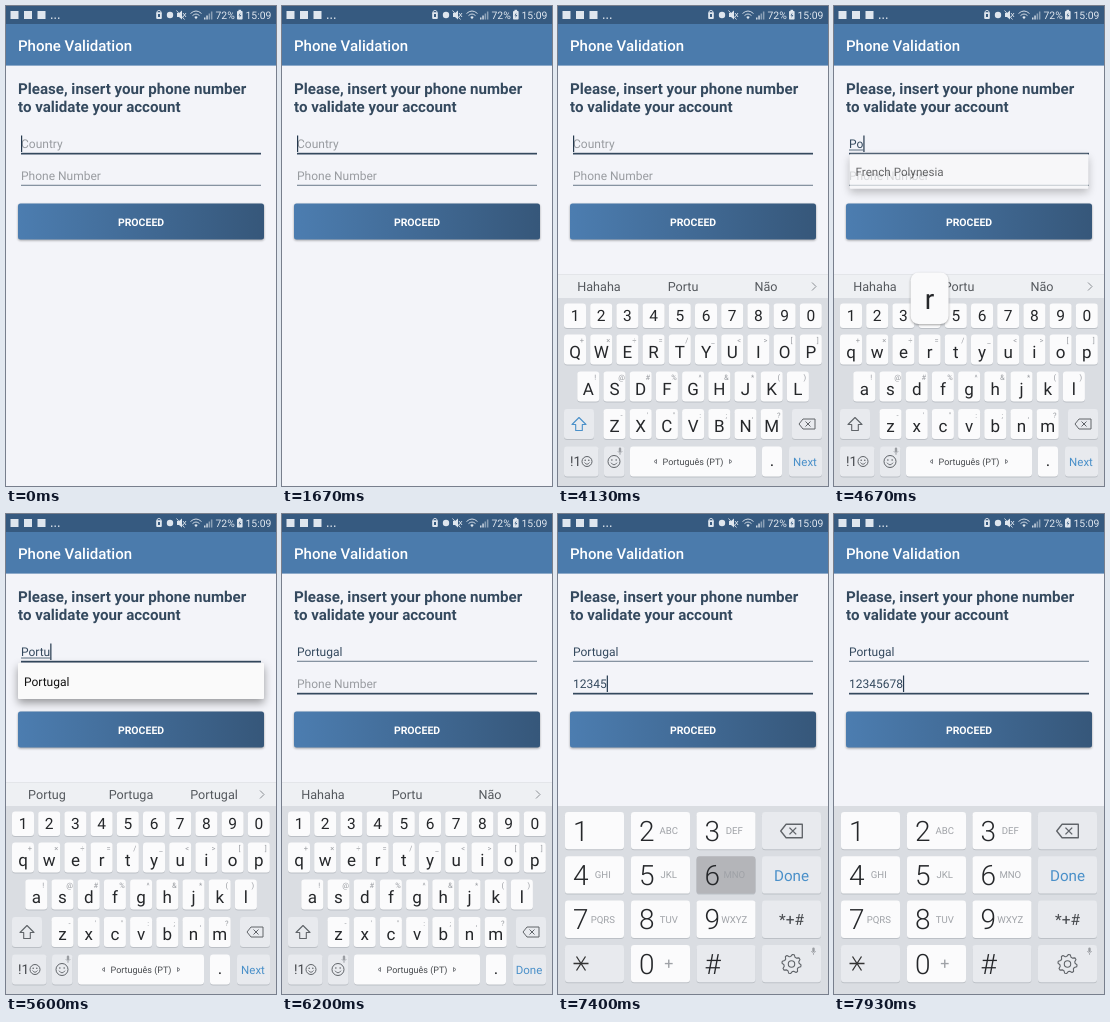
An HTML page that plays this animation: 270 by 480 pixels, repeating every 8 s.

```html
<!DOCTYPE html>
<html lang="en">
<head>
<meta charset="utf-8">
<title>Phone validation</title>
<style>
html, body { margin: 0; width: 100%; height: 100%; overflow: hidden; background: #f3f4f9; }
svg { display: block; width: 270px; height: 480px; }
text { font-family: Roboto, "Noto Sans", sans-serif; white-space: pre; text-rendering: geometricPrecision; }
.raised { filter: drop-shadow(0 1px 1.2px rgba(0, 0, 0, .35)); }
.menu { filter: drop-shadow(0 4px 4.5px rgba(0, 0, 0, .38)); }
</style>
</head>
<body>
<svg id="stage" viewBox="0 0 270 480">
  <defs>
    <linearGradient id="blue"><stop stop-color="#4c7db0"/><stop offset="1" stop-color="#36577a"/></linearGradient>
  </defs>
</svg>
<script>
const LOOP = 8000;
const INK = '#34495e', KEY = '#fbfbfc', SOFT = '#e8eaee', DOWN = '#b4b5b9', LINK = '#4a90c9', ICON = '#606469';
const stage = document.getElementById('stage');

function add(parent, tag, attrs, content) {
  const node = document.createElementNS('http://www.w3.org/2000/svg', tag);
  for (const name in attrs) node.setAttribute(name, attrs[name]);
  if (content !== undefined) node.textContent = content;
  return parent.appendChild(node);
}
const group = (parent, attrs = {}) => add(parent, 'g', attrs);
const rect = (parent, x, y, width, height, fill, rx = 0, more = {}) =>
  add(parent, 'rect', { x, y, width, height, fill, rx, ...more });
const label = (parent, str, x, y, size, fill, more = {}) =>
  add(parent, 'text', { x, y, 'font-size': size, fill, ...more }, str);
const mid = (parent, str, x, y, size, fill, more = {}) =>
  label(parent, str, x, y, size, fill, { 'text-anchor': 'middle', ...more });
const line = (parent, d, stroke, width = 1) =>
  add(parent, 'path', { d, stroke, fill: 'none', 'stroke-width': width, 'stroke-linejoin': 'round' });
const shape = (parent, d, fill) => add(parent, 'path', { d, fill });
const show = (node, on) => node.setAttribute('visibility', on ? 'inherit' : 'hidden');
const clamp = v => Math.max(0, Math.min(1, v));
const ramp = (t, from, to) => clamp((t - from) / (to - from));
const latest = (steps, t) => steps.reduce((found, step) => t >= step[0] ? step[1] : found, steps[0][1]);
const within = (spans, t) => spans.some(([from, to]) => t >= from && t < to);

// ---- page ----
rect(stage, 0, 0, 270, 480, '#f3f4f9');
rect(stage, 0, 18, 270, 41.6, '#4b7bac');
rect(stage, 0, 0, 270, 18, '#365a80');
drawStatus();
label(stage, 'Phone Validation', 12, 45, 15, '#fff', { 'font-weight': 500 });
label(stage, 'Please, insert your phone number', 12, 88, 15.1, INK, { 'font-weight': 700 });
label(stage, 'to validate your account', 12, 105.6, 15.1, INK, { 'font-weight': 700 });
const country = makeField('Country', 142);
const phone = makeField('Phone Number', 174);
rect(stage, 12, 197.5, 246, 36, 'url(#blue)', 2.5, { class: 'raised' });
mid(stage, 'PROCEED', 135, 219.6, 10.5, '#fff', { 'font-weight': 700 });

const menu = group(stage);
const menuRow = rect(menu, 12, 149, 246, 36, '#fafafa', 1, { class: 'menu' });
const menuText = label(menu, '', 18, 171.7, 12, '#111');

function drawStatus() {
  const s = group(stage), c = '#dfe6ee';
  for (const x of [4.5, 18, 31.5]) rect(s, x, 5, 8, 8, c);
  for (const x of [45, 48.5, 52]) rect(s, x, 11.5, 1.4, 1.4, c);
  line(s, 'M151 7V5.500Q153 3 155 5.500V7', c, .9);
  rect(s, 150.2, 6.2, 5.6, 6.8, c, 1);
  rect(s, 152, 8, 2, 3, '#365a80');
  add(s, 'circle', { cx: 164, cy: 9, r: 3.2, fill: c });
  shape(s, 'M171 7h2l3-2.5v9L173 11h-2z', c);
  line(s, 'M170.5 4.5l8 9M177 7l3 4M180 7l-3 4', c, .9);
  line(s, 'M184.5 7.5Q190 2.5 195.5 7.5M186.5 9.6Q190 6.4 193.5 9.6', c, .9);
  shape(s, 'M188.3 11Q190 9.6 191.7 11L190 13.2z', c);
  for (let i = 0; i < 4; i++)
    rect(s, 198 + i * 2.3, 11.5 - i * 2, 1.5, 2 + i * 2, c, 0, { opacity: i < 2 ? .9 : .5 });
  label(s, '72%', 209.5, 13, 10.4, c);
  rect(s, 231, 5, 5.6, 8.6, c, .8);
  rect(s, 232.5, 3.8, 2.6, 1.4, c);
  shape(s, 'M234.5 6.5l-2 3h1.4l-.6 2.6 2-3.2h-1.4z', '#365a80');
  label(s, '15:09', 239.5, 13, 10.4, c);
}

function makeField(hint, y) {
  const holder = label(stage, hint, 15, y, 12, '#999ca1');
  const value = label(stage, '', 15, y, 12, INK);
  const compose = rect(stage, 15, y + 1.6, 0, .8, INK);
  const rule = rect(stage, 15, y + 4.8, 240, 1, INK);
  const caret = rect(stage, 15, y - 12.5, 1.2, 16.5, '#25394e');
  return (str, focused, blink, composing) => {
    if (value.textContent !== str) value.textContent = str;
    const width = str ? value.getComputedTextLength() : 0;
    show(holder, !str);
    compose.setAttribute('width', composing ? width : 0);
    rule.setAttribute('height', focused ? 1.7 : .9);
    rule.setAttribute('opacity', focused ? 1 : .8);
    caret.setAttribute('x', 15 + width);
    show(caret, blink);
  };
}

// ---- keyboards ----
function key(parent, x, y, w, h, fill = KEY) {
  rect(parent, x, y + 1, w, h, '#a9adb4', 3.2, { opacity: .6 });
  return rect(parent, x, y, w, h, fill, 3.2);
}
function backspace(parent, x, y, s) {
  const g = group(parent, { transform: `translate(${x} ${y}) scale(${s})` });
  line(g, 'M-8 0L-4-5H8V5H-4zM-1.5-2.5l5 5M3.5-2.5l-5 5', ICON, 1);
}
function smile(parent, x, y, r) {
  add(parent, 'circle', { cx: x, cy: y, r, fill: 'none', stroke: ICON });
  for (const d of [-.36, .36]) add(parent, 'circle', { cx: x + d * r, cy: y - .25 * r, r: .8, fill: ICON });
  line(parent, `M${x - .5 * r} ${y + .2 * r}Q${x} ${y + .9 * r} ${x + .5 * r} ${y + .2 * r}`, ICON, .9);
}
function mic(parent, x, y) {
  rect(parent, x - 1.2, y - 3.5, 2.4, 4.6, '#9a9da2', 1.2);
  line(parent, `M${x - 2.3} ${y}q2.3 4 4.6 0M${x} ${y + 2}v2`, '#9a9da2', .7);
}

const board = group(stage);
const qwerty = group(board);
rect(qwerty, 0, 268, 270, 212, '#dadde2');
rect(qwerty, 0, 268, 270, 24, '#eef0f3');
rect(qwerty, 0, 268, 270, .7, '#dfe1e5');
const hints = [41, 125, 208].map(x => mid(qwerty, '', x, 285, 12.6, '#54585d'));
line(qwerty, 'M254 276.5l4 4-4 4', '#8b8f94');

const STEP = 26.2, letters = [], spots = {};
[...'1234567890'].forEach((n, i) => {
  const x = 17 + i * STEP;
  key(qwerty, x - 11, 297.5, 22, 24.5);
  mid(qwerty, n, x, 315, 15.5, '#25272a');
});
[
  ['qwertyuiop', '+×÷=/_<>[]', 17, 328.5],
  ['asdfghjkl', '!@#%^&*()', 30.3, 365.5],
  ['zxcvbnm', '-\'":;,?', 56.5, 403]
].forEach(([row, alts, x0, y]) => [...row].forEach((ch, i) => {
  const x = x0 + i * STEP;
  key(qwerty, x - 11, y, 22, 30);
  mid(qwerty, alts[i], x + 7, y + 8.5, 7.5, '#999ca1');
  letters.push([mid(qwerty, ch, x, y + 23.2, 17, '#25272a'), ch]);
  spots[ch] = [x, y];
}));
key(qwerty, 6, 403, 30, 30, SOFT);
const shift = line(qwerty, 'M21 411.5l7 7h-3.7v6h-6.6v-6h-3.7z', ICON, 1.1);
key(qwerty, 234, 403, 30, 30, SOFT);
backspace(qwerty, 249, 418, 1);
key(qwerty, 6, 440.5, 34.5, 30, SOFT);
label(qwerty, '!1', 12, 460, 13.5, '#45484c');
smile(qwerty, 29, 455.5, 5);
key(qwerty, 46, 440.5, 20.5, 30, SOFT);
smile(qwerty, 56, 455.5, 6);
mic(qwerty, 62, 445);
key(qwerty, 72, 440.5, 126, 30);
mid(qwerty, 'Português (PT)', 135, 458.5, 9, '#45484c');
line(qwerty, 'M98.5 453.5v4l-2.500-2zM171.500 453.500v4l2.500-2z', ICON, .8);
key(qwerty, 204, 440.5, 20, 30);
mid(qwerty, '.', 214, 460, 17, '#25272a');
key(qwerty, 231, 440.5, 33, 30, SOFT);
const action = mid(qwerty, 'Next', 247, 459.5, 11.5, LINK);

const pad = group(board);
rect(pad, 0, 268, 270, 24, '#f3f4f9');
rect(pad, 0, 292, 270, 188, '#dadde2');
const COLS = [7, 73, 138.5, 204], ROWS = [298, 342.3, 386.6, 431];
const padKeys = {};
['1', '2ABC', '3DEF', '4GHI', '5JKL', '6MNO', '7PQRS', '8TUV', '9WXYZ', '*', '0+', '#'].forEach((s, i) => {
  const x = COLS[i % 3], y = ROWS[Math.floor(i / 3)], symbol = '*#'.includes(s);
  padKeys[s[0]] = key(pad, x, y, 59, 37.3, symbol ? SOFT : KEY);
  if (s === '*') line(pad, 'M15.500 449.500h15M18.500 442.500l9 14M27.500 442.500l-9 14', '#333', 1.3);
  else label(pad, s[0], x + 8, y + 28.5, 28, '#25272a', { 'font-weight': 300 });
  mid(pad, s.slice(1), x + 37.8, y + (s === '0+' ? 24 : 22), s === '0+' ? 16 : 9.6, '#9fa2a7');
});
ROWS.forEach(y => key(pad, COLS[3], y, 59, 37.3, SOFT));
backspace(pad, 233.5, 317, 1.35);
mid(pad, 'Done', 233.5, 366.5, 15.2, LINK);
mid(pad, '*+#', 233.5, 411, 15.5, '#45484c');
drawGear(233.5, 450);
mic(pad, 255.5, 437);

function drawGear(cx, cy) {
  let d = '';
  for (let i = 0; i < 32; i++) {
    const a = (i + .5) / 32 * Math.PI * 2, r = i % 4 < 2 ? 9.6 : 7.6;
    d += (i ? 'L' : 'M') + (cx + r * Math.cos(a)).toFixed(2) + ' ' + (cy + r * Math.sin(a)).toFixed(2);
  }
  line(pad, d + 'z', ICON, 1.1);
  add(pad, 'circle', { cx, cy, r: 3.2, fill: 'none', stroke: ICON, 'stroke-width': 1.1 });
}

const bubble = group(stage);
rect(bubble, -19, 0, 38, 51.5, '#fafafb', 8, { class: 'raised' });
const bubbleText = mid(bubble, '', 0, 36, 28, '#25272a');

// ---- timeline ----
const COUNTRY = [[0, ''], [4270, 'P'], [4470, 'Po'], [4730, 'Por'], [4870, 'Port'], [5070, 'Portu'], [5800, 'Portugal']];
const TAPS = [['P', 4200, 4330], ['o', 4400, 4530], ['r', 4620, 4760], ['t', 4800, 4930], ['u', 5000, 5130]];
const DIGITS = [[6670, 6930], [6930, 7000], [7070, 7130], [7200, 7270], [7270, 7350], [7400, 7470], [7530, 7670], [7800, 7920]];
const COUNTRY_CARET = [[0, 70], [600, 1130], [1670, 2200], [2670, 3640], [4130, 5800]];
const PHONE_CARET = [[5870, 6200], [6670, LOOP]];
const IDLE = ['Hahaha', 'Portu', 'Não'];
const HINTS = [[0, IDLE], [5130, ['Portug', 'Portuga', 'Portugal']], [5930, IDLE]];
const PICKED = 5800, FOCUS_MOVE = 5870;

function render(t) {
  const onPhone = t >= FOCUS_MOVE;
  const digits = '12345678'.slice(0, DIGITS.filter(([down]) => t >= down + 40).length);
  country(latest(COUNTRY, t), !onPhone, within(COUNTRY_CARET, t), t < PICKED);
  phone(digits, onPhone, within(PHONE_CARET, t), false);

  const enter = ramp(t, 4590, 4720);
  menu.setAttribute('opacity', enter * (1 - ramp(t, 5770, 5930)));
  const k = .92 + .08 * enter;
  menu.setAttribute('transform', `translate(${135 * (1 - k)} ${149 * (1 - k) - 3 * (1 - enter)}) scale(${k})`);
  menuRow.setAttribute('fill', t >= 5730 ? '#e4e4e5' : '#fafafa');
  menuText.textContent = t < 4770 ? 'French Polynesia' : 'Portugal';

  const rise = 1 - (1 - ramp(t, 3200, 3470)) ** 3;
  show(board, rise > 0);
  board.setAttribute('transform', `translate(0 ${212 * (1 - rise)})`);
  const upper = t < 4270;
  for (const [node, ch] of letters) node.textContent = upper ? ch.toUpperCase() : ch;
  shift.setAttribute('stroke', upper ? LINK : ICON);
  latest(HINTS, t).forEach((word, i) => hints[i].textContent = word);
  action.textContent = t < 5930 ? 'Next' : 'Done';

  const swap = ramp(t, 6370, 6470);
  show(pad, swap > 0);
  pad.setAttribute('opacity', swap);
  DIGITS.forEach(([down, up], i) => padKeys[i + 1].setAttribute('fill', t >= down && t < up ? DOWN : KEY));

  const tap = TAPS.find(([, down, up]) => t >= down && t < up);
  show(bubble, !!tap);
  if (tap) {
    const [x, y] = spots[tap[0].toLowerCase()];
    bubble.setAttribute('transform', `translate(${Math.min(x, 250)} ${y - 62})`);
    bubbleText.textContent = tap[0];
  }
}

const start = performance.now();
function tick() {
  render((performance.now() - start) % LOOP);
  requestAnimationFrame(tick);
}
tick();
</script>
</body>
</html>
```
